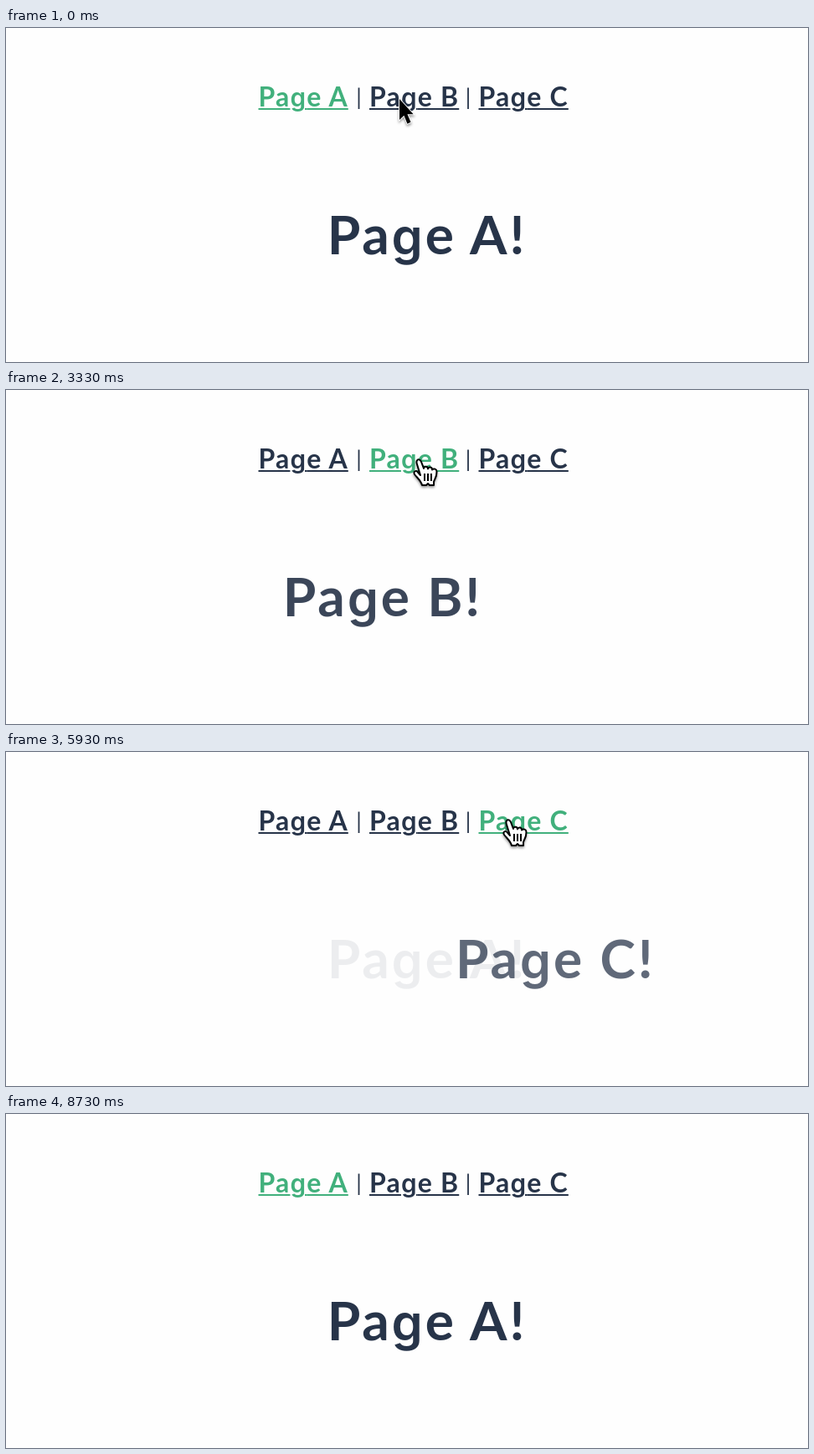
An HTML page for the animation above (8990 ms loop, 958 by 400 pixels).

```html
<!DOCTYPE html>
<html lang="en">
<head>
<meta charset="utf-8">
<title>Page transitions</title>
<style>
  html, body { margin: 0; width: 100%; height: 100%; overflow: hidden; background: #fefefe; }
  body { position: relative; color: #273449; }
  body > * { position: absolute; white-space: pre; }
  a, i { top: 63.4px; font: bold 32px/1.2 Lato, "Open Sans", sans-serif; letter-spacing: .037em; }
  a { text-decoration: underline 2px; text-underline-offset: 2px; }
  i { top: 66.500px; font-size: 26px; font-weight: 400; letter-spacing: 0; width: 20px; text-align: center; }
  h1 { margin: 0; left: 203px; top: 208.8px; width: 600px; text-align: center;
       font: bold 64px/1.2 Lato, "Open Sans", sans-serif; letter-spacing: .045em; }
  /* single-storey g at the x-height of the other letters */
  b { font: 600 .93em/0 Inter, sans-serif; }
  svg { left: 0; top: 0; overflow: visible; filter: drop-shadow(0 2px 1.5px rgba(0, 0, 0, .4)); }
</style>
</head>
<body>
<a style="left:301.5px">Pa<b>g</b>e A</a><i style="left:411.5px">|</i>
<a style="left:434px">Pa<b>g</b>e B</a><i style="left:542px">|</i>
<a style="left:564.5px">Pa<b>g</b>e C</a>
<h1>Pa<b>g</b>e A!</h1><h1>Pa<b>g</b>e B!</h1><h1>Pa<b>g</b>e C!</h1>
<svg width="34" height="36">
  <path id="arrow" transform="scale(.9 .96)" d="M0 0V26L6 20.5L10.5 31L15 29L10.5 19H18.5Z" fill="#000" stroke="#fff" stroke-width="2" paint-order="stroke"/>
  <g id="hand" transform="translate(-7 -1)" stroke="#000" stroke-width="2" stroke-linejoin="round">
    <path fill="#fff" d="M9 20L5 7C3 1 8-1 10 4L13 12C13 9 18 9 18 12.5C19 9.5 23 10 23 13.5C25 11.5 28.5 12.5 28.5 16C28.5 23 26 24 25 28V32H20L18 30L16 32H11C10 27 5 23 2 19C0 15 4 14 6 16.5Z"/>
    <path d="M14 18v9M18 18v9M22 18v9"/>
  </g>
</svg>
<script>
const LOOP = 8990, STEP = 1000 / 15, LAST_STEP = 131;
const SLIDE = 575, ENTER = 550, LEAVE = 440;
const links = document.querySelectorAll('a');
const pages = document.querySelectorAll('h1');
const cursor = document.querySelector('svg');
const arrow = document.getElementById('arrow');
const hand = document.getElementById('hand');

// [time, page opened]
const clicks = [[-2000, 0], [270, 1], [1435, 2], [2900, 1], [4130, 0], [5580, 2], [7066, 0]];
// [start, end, x, y, height of the arc]
const moves = [
  [500, 980, 608, 82, 58], [1600, 2300, 493, 83, 60], [3480, 4030, 368, 87, 62],
  [4800, 5350, 600, 81, 65], [6560, 7000, 355, 83, 63], [7600, 8300, 600, 80, 10],
  [8400, 8710, 632, 405, 0]
];
const linkSpans = [[301, 409], [434, 540], [564, 671]];

const clamp = v => Math.min(1, Math.max(0, v));

// cubic-bezier(.42, 0, .58, 1)
function easeInOut(x) {
  x = clamp(x);
  let low = 0, high = 1, u = x;
  for (let i = 0; i < 20; i++) {
    u = (low + high) / 2;
    const at = 1.26 * (1 - u) ** 2 * u + 1.74 * (1 - u) * u * u + u ** 3;
    if (at < x) low = u; else high = u;
  }
  return u * u * (3 - 2 * u);
}

function drawPages(time) {
  const n = clicks.findLastIndex(([start]) => time >= start);
  const [start, current] = clicks[n];
  const previous = n ? clicks[n - 1][1] : current;
  const entered = easeInOut((time - start) / ENTER);
  const left = easeInOut((time - start) / LEAVE);
  const side = Math.sign(current - previous);
  pages.forEach((page, i) => {
    page.style.opacity = i === current ? entered : i === previous ? 1 - left : 0;
    page.style.transform = i === current ? `translateX(${side * SLIDE * (1 - entered)}px)` : '';
    links[i].style.color = i === current ? '#41b07c' : '';
  });
}

function drawCursor(time) {
  let x = 470, y = 85;
  for (const [start, end, toX, toY, lift] of moves) {
    if (time < start) break;
    const p = easeInOut((time - start) / (end - start));
    x += (toX - x) * p;
    y += (toY - y) * p - lift * Math.sin(Math.PI * p);
  }
  const onLink = time > 130 && y > 66 && y < 104 && linkSpans.some(([a, b]) => x >= a && x <= b);
  hand.style.display = onLink ? '' : 'none';
  arrow.style.display = onLink ? 'none' : '';
  cursor.style.transform = `translate(${x}px, ${y}px)`;
}

function frame() {
  const time = Math.min(LAST_STEP, Math.floor((performance.now() % LOOP + 5) / STEP)) * STEP;
  drawPages(time);
  drawCursor(time);
  requestAnimationFrame(frame);
}
frame();
</script>
</body>
</html>
```
